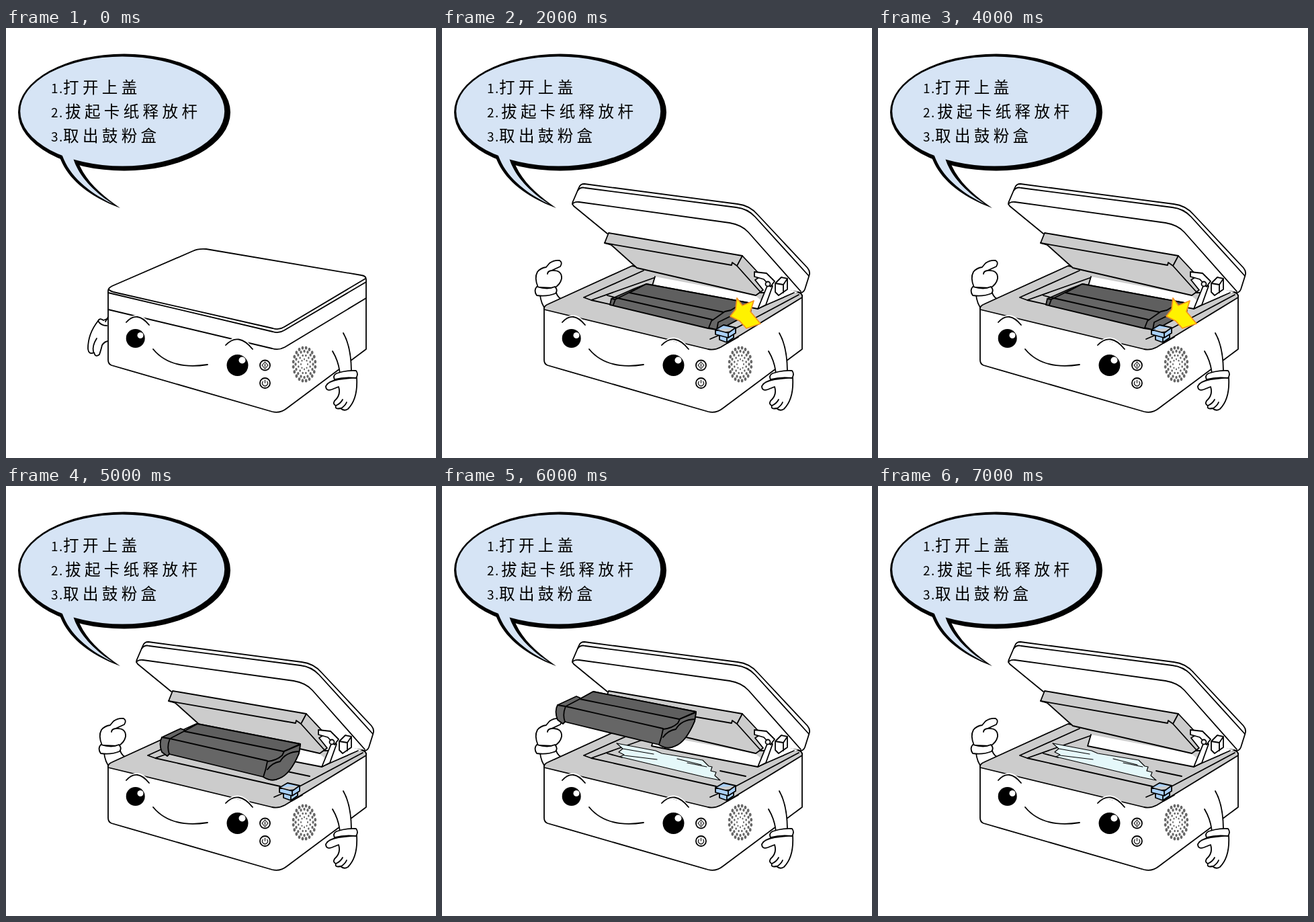
An HTML page that plays this animation: 640 by 640 pixels, repeating every 9000 ms.

```html
<!DOCTYPE html>
<html lang="zh">
<head>
<meta charset="utf-8">
<style>
  html, body { margin: 0; width: 100%; height: 100%; overflow: hidden; background: #fff; }
  svg { display: block; width: 100vw; height: 100vh; }
  path, circle { stroke: #000; stroke-width: 1.8; stroke-linejoin: round; stroke-linecap: round; fill: #fff; }
  .line { fill: none; }
  .bare { stroke: none; }
  .gray { fill: #ccc; }
  .dark { fill: #666; }
  .top { fill: #5f5f5f; }
  .blue { fill: #a9d0f8; }
  .ink { fill: #000; stroke: none; }
  .halo { fill: none; stroke: #fff; stroke-width: 6; }
  .thin { fill: none; stroke-width: 1.1; }
  .bubble { fill: #d6e4f5; stroke: none; }
  text { font: 23.5px "Noto Sans CJK SC", "Noto Sans CJK", sans-serif; letter-spacing: 5.4px; }
  text .num { font-size: 19px; letter-spacing: 1.5px; }
</style>
</head>
<body>
<svg viewBox="0 0 640 640">
  <!-- speech bubble -->
  <ellipse cx="176" cy="125.5" rx="158" ry="87"/>
  <path class="ink" d="M78 186C87 221 121 250 170 268C141 248 117 226 107 198Z"/>
  <ellipse class="bubble" cx="173.2" cy="124" rx="152" ry="81.5"/>
  <path class="bubble" d="M82 184C92 220 124 245 159 262C130 243 108 220 100 194Z"/>
  <g id="words"></g>

  <!-- lid closed -->
  <g id="closed">
    <path d="M153 432L145 435Q139 431 137 436Q122 455 122 477Q123 487 131 483Q133 491 139 486Q142 477 143 472Q147 466 153 466"/>
    <path class="line" d="M137 436Q141 443 150 443M130 482Q128 473 135 462M148 437L152 430"/>
    <path d="M152 391Q152 387 158 384L278 332Q286 328 298 329L529 368Q536 369 536 374V478L418 566Q408 574 396 571L157 502Q152 500 152 494Z"/>
    <path class="line" d="M153 389Q154 391 160 393L397 447Q406 450 414 445L535 373M152 394L397 452Q406 455 414 450L536 378M152 419L396 477Q406 480 415 475L536 402"/>
  </g>

  <!-- lid open -->
  <g id="open">
    <path class="bare" d="M194 262L204 238Q206 232 212 232L440 262Q458 264 470 278L544 357Q549 363 546 370L540 389Q537 396 530 393L480 395L300 350L246 306Z"/>
    <path class="line" d="M246 306L196 265Q193 262 195 258L204 237Q206 232 212 232L440 262Q458 264 470 278L544 357Q549 363 546 370L540 389Q537 396 530 393L514 391"/>
    <path class="line" d="M202 242Q206 236 213 238L438 267Q455 269 466 281L546 369M194 262Q197 258 204 259L428 290Q446 293 456 304L534 392"/>
    <path d="M146 397Q147 410 155 420L180 405Q172 401 170 394"/>
    <path d="M143 386Q137 372 142 363Q147 357 155 356L160 350Q167 345 175 346Q180 349 176 355L163 361Q179 360 178 373Q176 382 167 387Z"/>
    <path class="line" d="M163 361Q157 362 157 366"/>
    <path d="M141 385Q136 391 141 398Q157 400 169 395Q173 390 168 385Q158 390 141 385Z"/>
    <path d="M152 417L536 398V478L418 566Q408 574 396 571L157 502Q152 500 152 494Z"/>
    <path class="gray" d="M152 419Q151 414 158 411L283 354L470 394L528 393Q537 394 536 401L415 475Q406 480 396 478Z"/>
    <path class="line" d="M211 401L300 361M211 401L222 405L318 371M222 405L408 447M246 398L268 404M414 424L452 432M437 447L531 397"/>
    <path d="M317 370L312 387L372 399L470 418L490 383L530 393L483 412L466 398Z" class="bare"/>
    <path class="line" d="M317 370L312 387L372 399L470 418L483 412L524 394"/>
    <path id="paper" style="fill:#e5f8fa;stroke-width:1.2" d="M260 383L318 394L327 398L388 408L397 417L402 418L400 424L408 426L406 431L414 438L390 433L265 403L271 400L263 396L269 391ZM269 391L315 399M271 401L320 407M350 406L386 415M365 412L394 418"/>
    <path class="gray" d="M242 320L248 305L447 339L475 369L466 375L478 390L467 398L290 357L252 323Z"/>
    <path class="line" d="M242 320L431 353L432 349L439 354L447 339M439 354L474 393"/>
    <path d="M470 418L484 384L492 384L482 412Z"/>
    <path d="M465 363L483 365L495 377L489 385L479 374L465 370Z"/>
    <circle cx="485" cy="381" r="3.5"/>
    <path d="M496 380L505 371L514 373V389L501 398L496 393ZM496 380L508 382V394M508 382L514 373"/>
    <g id="seated">
      <path class="dark" d="M250 412L252 403L286 388L304 381L456 409L461 413L459 424L422 444L409 449L396 447Z"/>
      <path class="top" d="M279 394L304 381L456 409L424 424Z"/>
      <path class="line" d="M257 401L402 434M252 403L258 404L255 412M258 404L286 390"/>
      <path class="dark" d="M397 446L401 436L421 422L430 420L438 415L460 413L459 424L422 444L409 449ZM409 449L411 438L460 414"/>
    </g>
    <g id="flat">
      <path class="line" d="M399 462L410 456M425 469L441 460"/>
      <path class="blue" d="M406 460L419 452L437 456L424 466Z"/>
      <path class="line" d="M406 460V463L424 468L437 458"/>
    </g>
    <g id="raised">
      <path class="line" d="M399 463L413 457M425 469L441 460"/>
      <path class="blue" d="M413 454V464L424 468L434 461V452ZM424 457V468"/>
      <path class="blue" d="M407 449L419 442L437 446V454L426 461L407 456ZM407 449L426 454L437 446M426 454V461"/>
    </g>
    <path id="burst" style="fill:#fff200;stroke:#f7941d" d="M439 402L447 413L464 406L459 422L474 440L453 447L443 436L429 429L437 419Z"/>
    <g id="cartridge">
      <path class="dark" d="M172 348Q167 335 172 326L200 313L207 316L225 306L378 336L376 350Q363 381 347 387Q336 393 323 385L183 351L180 354Z"/>
      <path class="top" d="M205 317L225 306L378 336L353 347Z"/>
      <path class="line" d="M172 326L184 328L329 361M207 316L184 328Q179 340 183 351"/>
      <path class="dark" d="M323 385Q327 374 329 362Q342 361 351 353L354 347L378 337L376 350Q363 381 347 387Q335 393 323 385ZM329 374Q336 364 348 362Q356 348 376 347"/>
    </g>
  </g>

  <!-- face and front panel -->
  <path class="halo" d="M181 437Q196 422 211 440M330 471Q346 454 364 476"/>
  <path class="line" d="M179 438Q195 420 213 442M327 472Q346 452 367 478"/>
  <path class="line" d="M219 478C238 501 268 506 300 501"/>
  <circle class="ink" cx="192.7" cy="462" r="14"/>
  <circle class="bare" cx="200" cy="457.500" r="4.500"/>
  <circle class="ink" cx="344.500" cy="502" r="16"/>
  <circle class="bare" cx="351.500" cy="494.500" r="5"/>
  <circle cx="385.500" cy="502" r="7.500"/>
  <circle cx="385.500" cy="528.500" r="7.500"/>
  <path class="thin" d="M385.500 497L390 502L385.500 507L381 502ZM385.500 500V504M382.500 526A4 4 0 1 0 388.500 526M385.500 524V528"/>
  <g id="speaker" fill="#666"></g>

  <!-- right arm -->
  <path class="bare" d="M502 454Q514 475 514 514L497 518Q496 498 486 481Z"/>
  <path class="line" d="M502 454Q514 475 514 512M486 481Q496 498 497 516"/>
  <path d="M495 523Q479 526 476 533Q476 541 485 538L495 534Q499 546 489 555Q486 560 491 562Q489 568 498 566Q503 571 509 567Q524 552 522 520Z"/>
  <path class="line" d="M491 562Q498 559 501 553M499 566Q505 562 507 557"/>
  <path d="M492 514Q486 517 489 523Q505 519 521 521Q525 515 521 510Q507 509 492 514Z"/>
</svg>
<script>
  const byId = id => document.getElementById(id);

  byId('words').innerHTML = ['打开上盖', '拔起卡纸释放杆', '取出鼓粉盒'].map((words, i) =>
    `<text y="${97 + 36 * i}"><tspan class="num" x="67">${i + 1}.</tspan>` +
    `<tspan x="${i === 1 ? 88 : 85}">${words}</tspan></text>`).join('');

  let dots = '';
  [5, 9, 13, 16.5].forEach((radius, ring) => {
    const count = 8 + 4 * ring;
    const size = 1 + 0.3 * ring;
    for (let i = 0; i < count; i++) {
      const a = (i + ring / 2) / count * 2 * Math.PI;
      const x = 444 + radius * Math.cos(a);
      const y = 500.5 + 1.5 * radius * Math.sin(a);
      dots += `<ellipse cx="${x}" cy="${y}" rx="${size}" ry="${1.4 * size}"/>`;
    }
  });
  byId('speaker').innerHTML = dots;

  const lift = [[60, 48], [40, 25], [0, 0], [-65, -29]];
  const show = (id, on) => byId(id).style.display = on ? '' : 'none';

  function draw() {
    const step = Math.floor(performance.now() % 9000 / 500);
    const pose = lift[step - 10];
    show('closed', step < 2);
    show('open', step >= 2);
    show('flat', step < 4);
    show('raised', step >= 4);
    show('burst', step >= 4 && step < 10 && step % 2 === 0);
    show('seated', step < 10);
    show('paper', step > 10);
    show('cartridge', pose);
    if (pose) byId('cartridge').setAttribute('transform', `translate(${pose})`);
    requestAnimationFrame(draw);
  }
  draw();
</script>
</body>
</html>
```
